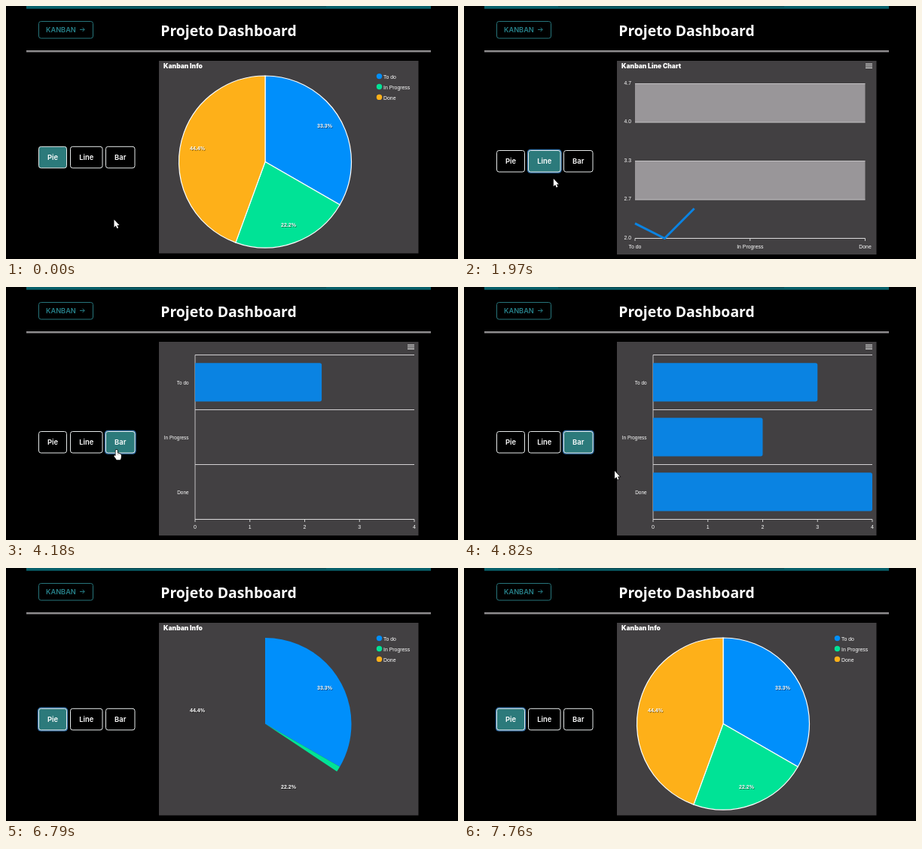
Animation, 600 px wide and 337 px high, one loop 7790 ms. Source, as an HTML page with a canvas:

```html
<!DOCTYPE html>
<html lang="pt">
<head>
<meta charset="utf-8">
<title>Projeto Dashboard</title>
<style>
html, body { margin: 0; width: 100%; height: 100%; overflow: hidden; background: #000; }
canvas { display: block; width: 600px; height: 337px; }
</style>
</head>
<body>
<canvas id="stage"></canvas>
<script>
const LOOP = 7790;
const W = 600, H = 337;
const LINE_AT = 1640, BAR_AT = 3965, PIE_AT = 6450;
const PIE_START = 6516, PIE_TIME = 800;
const SANS = '"Liberation Sans", Arial, sans-serif';
const UI = 'Inter, sans-serif';
const BLUE = '#008ffb', GREEN = '#00e396', AMBER = '#feb019';
const SERIES = '#0a83e2', PANEL = '#424042', TEAL = '#2c7a7b';

const NAMES = ['To do', 'In Progress', 'Done'];
const VALUES = [3, 2, 4];
const COLORS = [BLUE, GREEN, AMBER];
const BUTTONS = [
  { label: 'Pie', x: 43.5, w: 37 },
  { label: 'Line', x: 85.5, w: 42.5 },
  { label: 'Bar', x: 132.5, w: 38.5 }
];

// time, x, y of the pointer tip
const POINTER = [
  [0, 143.5, 284.5], [100, 143.5, 284.5], [1120, 104.5, 204.5], [1660, 104.5, 204.5],
  [2320, 136, 260.5], [3150, 136, 260.5], [3800, 146.7, 216.5], [4280, 146.7, 216.5],
  [4740, 200, 245], [5500, 200, 245], [6150, 73, 209.5], [6490, 73, 209.5],
  [6760, 92, 352], [LOOP, 92, 352]
];

const canvas = document.getElementById('stage');
const ctx = canvas.getContext('2d');
const ratio = window.devicePixelRatio || 1;
canvas.width = Math.round(W * ratio);
canvas.height = Math.round(H * ratio);

const clamp = v => Math.max(0, Math.min(1, v));
const mix = (a, b, k) => a + (b - a) * k;
const easeInOut = k => (1 - Math.cos(Math.PI * k)) / 2;
const easeOut = k => 1 - (1 - k) * (1 - k);

function rect(x, y, w, h, color) {
  ctx.fillStyle = color;
  ctx.fillRect(x, y, w, h);
}

function text(str, x, y, font, color = '#fff', align = 'left') {
  ctx.font = font;
  ctx.fillStyle = color;
  ctx.textAlign = align;
  ctx.fillText(str, x, y);
}

function line(points, color, width) {
  ctx.beginPath();
  points.forEach(p => ctx.lineTo(p[0], p[1]));
  ctx.strokeStyle = color;
  ctx.lineWidth = width;
  ctx.stroke();
}

function roundBox(x, y, w, h, r) {
  ctx.beginPath();
  ctx.roundRect(x, y, w, h, r);
}

function header() {
  rect(27, 0, 537, 4, '#08606a');
  rect(125, 0, 300, 1.5, '#0a4d55');
  rect(27, 3, 537, 1, '#06454c');
  rect(27, 59, 537, 2.5, '#8e8c8e');

  roundBox(43.5, 20.5, 72, 22.5, 3);
  ctx.strokeStyle = '#27757b';
  ctx.lineWidth = 1;
  ctx.stroke();
  text('KANBAN', 53, 34.6, '600 9.2px ' + UI, '#27818a');
  line([[98, 31.4], [104, 31.4]], '#27818a', 1);
  line([[101.6, 28.8], [104.2, 31.4], [101.6, 34]], '#27818a', 1);

  text('Projeto Dashboard', 295.5, 39.8, '700 19.4px "Open Sans", "Noto Sans", sans-serif', '#fff', 'center');
}

function buttons(active, focused, top) {
  BUTTONS.forEach((b, i) => {
    const on = i === active;
    if (on && focused) {
      roundBox(b.x - 1.7, top - 1.7, b.w + 3.4, 31.9, 4.5);
      ctx.fillStyle = '#2f6da3';
      ctx.fill();
    }
    roundBox(b.x, top, b.w, 28.5, 3);
    ctx.fillStyle = on ? TEAL : '#000';
    ctx.fill();
    ctx.strokeStyle = '#e6eaea';
    ctx.lineWidth = 1;
    ctx.stroke();
    text(b.label, b.x + b.w / 2, top + 17.7, '600 9.4px ' + UI, '#fff', 'center');
  });
}

function menuIcon() {
  [77.2, 79.8, 82.4].forEach(y => rect(533, y - 0.5, 9, 1.1, '#e8e8e8'));
}

function chartTitle(str) {
  text(str, 209, 82.6, '900 8.55px ' + UI);
}

function pieChart(k) {
  rect(203, 73, 344.5, 256.5, PANEL);
  chartTitle('Kanban Info');
  const cx = 344, cy = 207.5, r = 114.5;
  const shares = [3 / 9, 2 / 9, 4 / 9];
  let from = 0;
  shares.forEach((s, i) => {
    const to = Math.min(from + s, k);
    if (to > from) {
      const turn = Math.PI * 2, up = -Math.PI / 2;
      ctx.beginPath();
      ctx.moveTo(cx, cy);
      ctx.arc(cx, cy, r, up + from * turn, up + to * turn);
      ctx.closePath();
      ctx.fillStyle = COLORS[i];
      ctx.fill();
      if (k >= 1) {
        ctx.strokeStyle = '#fff';
        ctx.lineWidth = 1.2;
        ctx.stroke();
      }
    }
    from += s;
  });

  const bold = '700 7px ' + SANS;
  [['33.3%', 423, 162], ['22.2%', 375, 294], ['44.4%', 254, 192]].forEach(([str, x, y]) => {
    text(str, x + 0.7, y + 0.7, bold, 'rgba(0,0,0,.5)', 'center');
    text(str, x, y, bold, '#fff', 'center');
  });

  NAMES.forEach((name, i) => {
    const y = 93.6 + i * 13.9;
    ctx.beginPath();
    ctx.arc(495.5, y, 3.7, 0, Math.PI * 2);
    ctx.fillStyle = COLORS[i];
    ctx.fill();
    text(name, 501, y + 3.3, '6.9px ' + SANS);
  });
}

function lineChart(k) {
  rect(203, 73, 344.5, 258, PANEL);
  chartTitle('Kanban Line Chart');
  menuIcon();
  const left = 227, right = 532.5, top = 103.5, step = 51.5, base = top + step * 4;
  rect(left, top, right - left, step, '#999699');
  rect(left, top + step * 2, right - left, step, '#999699');
  ['4.7', '4.0', '3.3', '2.7', '2.0'].forEach((str, i) => {
    const y = top + i * step;
    line([[left, y], [right, y]], i < 4 ? '#c4c2c4' : '#dcdcdc', 1);
    text(str, 222, y + 1.3, '6.8px ' + SANS, '#fff', 'right');
  });
  NAMES.forEach((name, i) => {
    const x = mix(left, right, i / 2);
    line([[x, base], [x, base + 3.5]], '#dcdcdc', 0.9);
    text(name, x, 323.4, '6.9px ' + SANS, '#fff', 'center');
  });
  if (k <= 0) return;

  // the path unfolds from the lower left corner
  const points = VALUES.map((v, i) => [
    mix(left, mix(left, right, i / 2), k),
    mix(base, base - (v - 2) * step * 1.5, k)
  ]);
  line(points, SERIES, 3);
}

function barChart(t) {
  rect(203, 73, 344.5, 258, PANEL);
  menuIcon();
  const left = 251, unit = 72.75, top = 90.5, row = 73, base = 309.5;
  for (let i = 0; i < 3; i++) {
    const y = top + i * row;
    line([[left, y], [542, y]], '#d2d0d2', 1);
  }
  line([[left, top], [left, base]], '#cfcdcf', 0.9);
  line([[left, base], [542, base]], '#dcdcdc', 1);
  for (let n = 0; n <= 4; n++) {
    const x = left + n * unit;
    line([[x, base], [x, base + 3.5]], '#dcdcdc', 0.9);
    text(String(n), x, 322.2, '7px ' + SANS, '#fff', 'center');
  }
  VALUES.forEach((v, i) => {
    const k = easeOut(clamp((t - i * 220) / 415));
    const y = top + 10.7 + i * row;
    text(NAMES[i], 242.5, y + 29, '6.4px ' + SANS, '#fff', 'right');
    if (k <= 0) return;
    const w = v * unit * k, r = Math.min(2.6, w / 2);
    roundBox(left, y, w, 51.2, [0, r, r, 0]);
    ctx.fillStyle = SERIES;
    ctx.fill();
  });
}

function pointerAt(t) {
  let i = 0;
  while (i < POINTER.length - 2 && t >= POINTER[i + 1][0]) i++;
  const a = POINTER[i], b = POINTER[i + 1];
  const k = easeInOut(clamp((t - a[0]) / (b[0] - a[0])));
  return [mix(a[1], b[1], k), mix(a[2], b[2], k)];
}

const ARROW = new Path2D('M0 0V10.2L2.3 8.1L3.9 11.7L5.6 10.9L4 7.5H7Z');
const HAND = new Path2D('M-1.2 1Q0-.7 1.2 1V5Q2.6 4.2 3.1 5.5Q4.4 4.8 4.8 6.2Q6.2 5.9 6.2 7.4V10' +
  'Q6 12 5 13.8H0Q-.8 12-3 9.6Q-3.8 7.7-2.3 7.8L-1.2 8.8Z');

function pointer(t, top) {
  const [x, y] = pointerAt(t);
  const over = y > top && y < top + 28.5 && BUTTONS.some(b => x > b.x && x < b.x + b.w);
  const shape = over ? HAND : ARROW;
  ctx.save();
  ctx.translate(x, y);
  ctx.strokeStyle = '#000';
  ctx.lineWidth = 1.3;
  ctx.stroke(shape);
  ctx.fillStyle = '#fff';
  ctx.fill(shape);
  if (over) {
    line([[1.4, 5.4], [1.4, 7.4]], '#777', 0.5);
    line([[3.2, 6], [3.2, 7.6]], '#777', 0.5);
  }
  ctx.restore();
}

function draw(t) {
  ctx.setTransform(ratio, 0, 0, ratio, 0, 0);
  rect(0, 0, W, H, '#000');
  const active = t < LINE_AT || t >= PIE_AT ? 0 : t < BAR_AT ? 1 : 2;
  const top = active ? 192.5 : 187.3;
  header();
  buttons(active, t >= LINE_AT, top);
  if (active === 1) lineChart(easeInOut(clamp((t - LINE_AT - 60) / 800)));
  else if (active === 2) barChart(t - BAR_AT);
  else pieChart(t < LINE_AT ? 1 : clamp((t - PIE_START) / PIE_TIME));
  pointer(t, top);
}

const start = performance.now();
function tick() {
  draw((performance.now() - start) % LOOP);
  requestAnimationFrame(tick);
}
tick();
</script>
</body>
</html>
```
